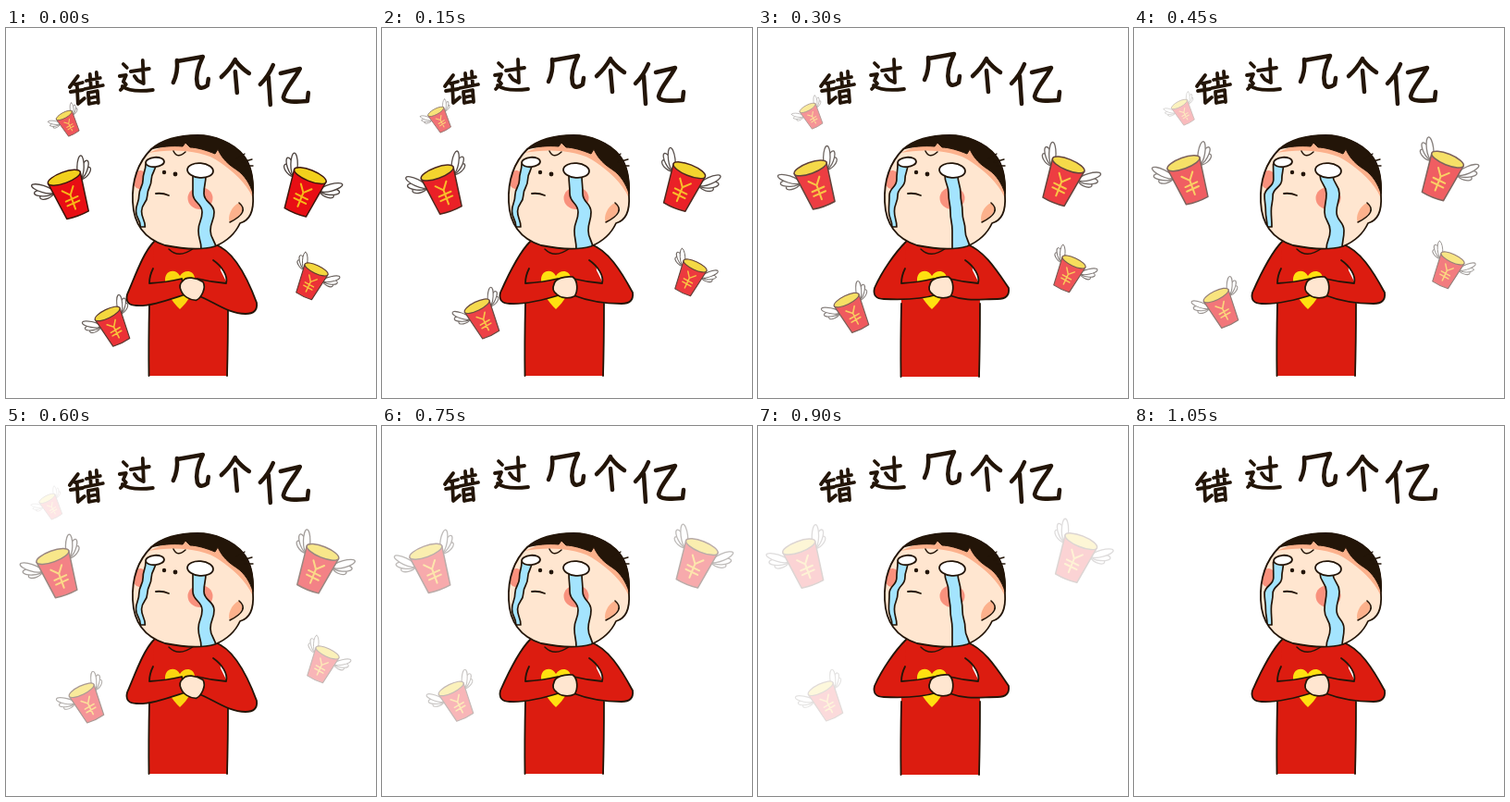
Write an HTML page with a canvas that moves like this. It is 400 px wide and 400 px high and loops after 1200 ms.

```html
<!DOCTYPE html>
<html lang="zh">
<head>
<meta charset="utf-8">
<style>
html, body { margin: 0; width: 100%; height: 100%; overflow: hidden; background: #fff; }
canvas { display: block; width: 100%; height: 100%; }
</style>
</head>
<body>
<canvas id="stage" width="400" height="400" role="img" aria-label="错过几个亿"></canvas>
<script>
const ctx = document.getElementById('stage').getContext('2d');
const STEP = 150, STEPS = 8;
const INK = '#231508', RED = '#dc1c10', SKIN = '#ffe6d0', PEACH = '#fcb18c';
const CORAL = '#f9917d', TEAR = '#a4e4fe', YELLOW = '#ffe010';

ctx.lineCap = ctx.lineJoin = 'round';

function draw(d, fill, stroke, width = 1.8) {
  const p = new Path2D(d);
  if (fill) { ctx.fillStyle = fill; ctx.fill(p); }
  if (stroke) { ctx.strokeStyle = stroke; ctx.lineWidth = width; ctx.stroke(p); }
}

function oval(x, y, rx, ry, rot, fill, stroke, width = 1.8) {
  ctx.beginPath();
  ctx.ellipse(x, y, rx, ry, rot, 0, Math.PI * 2);
  ctx.fillStyle = fill;
  ctx.fill();
  if (stroke) { ctx.strokeStyle = stroke; ctx.lineWidth = width; ctx.stroke(); }
}

function placed(x, y, paint) {
  ctx.save();
  ctx.translate(x, y);
  paint();
  ctx.restore();
}

// Hand-lettered strokes, one entry per character
const letters = [
  'M77 51L68 63M74 60L82 58M69 68L82 66M76 60L77 81L84 75M86 56L101 53M90 49L91 63M97 47L98 61M84 65L104 61M88 69L89 81M88 69L98 67L99 80M89 75L98 73M89 81L99 79',
  'M126 38L130 42M122 51L129 50L126 57L129 60L123 66M125 62Q134 69 158 66M134 46L154 43M147 34L148 59L142 56M138 51L141 55',
  'M184 34C185 44 183 52 180 58M184 35L212 30C207 40 204 51 206 60Q209 67 217 61L218 54',
  'M247 33Q241 44 232 52M247 34Q254 43 262 48M247 46L249 69',
  'M288 39Q283 51 274 60M283 52L285 82M296 48L317 43C311 55 301 64 299 74C300 80 312 79 325 78L326 69'
];

function title(pose) {
  letters.forEach((d, i) => {
    const dx = pose ? 0 : 0.8;
    const dy = i === 2 ? [1, 0, -2][pose] : pose ? 0 : 1;
    placed(dx, dy, () => draw(d, null, INK, i < 2 ? 3.8 : 4.5));
  });
}

// Flying cups: start, velocity, y acceleration, size, tilt, fade
const cups = [
  { x: 70, y: 181.5, vx: -3.1, vy: -5.2, size: 1, tilt: -20, alpha: 1, end: 7, power: 1.3 },
  { x: 321, y: 179, vx: 3.4, vy: -5.8, size: 1, tilt: 22, alpha: 1, end: 7, power: 1.3 },
  { x: 68, y: 104, vx: -4.6, vy: -4, size: 0.52, tilt: -28, alpha: 0.7, end: 4.6, power: 1.2 },
  { x: 117, y: 324, vx: -7, vy: -9, ay: 0.8, size: 0.8, tilt: -26, alpha: 0.85, end: 7, power: 1.3 },
  { x: 329, y: 275, vx: 3, vy: -4, size: 0.74, tilt: 25, alpha: 0.85, end: 5, power: 2 }
];

function wing(x, y, angle, side, line) {
  placed(x, y, () => {
    ctx.scale(side, 1);
    ctx.rotate(angle);
    [[-0.4, 16], [-0.05, 21], [0.3, 25]].forEach(([turn, len]) => {
      ctx.save();
      ctx.rotate(-turn);
      oval(len / 2, 0, len / 2, 3.7, 0, '#fff', line, 1.3);
      ctx.restore();
    });
  });
}

function cup(c, s) {
  const a = c.alpha * (1 - (s / c.end) ** c.power);
  if (s >= c.end || a <= 0) return;
  const tint = (...rgb) => `rgb(${rgb.map(v => Math.round(255 + (v - 255) * a))})`;
  const line = tint(60, 22, 12), feather = tint(75, 65, 60);
  const flap = s % 2 * 0.14;
  placed(c.x + c.vx * s, c.y + c.vy * s + (c.ay || 0) * s * s, () => {
    ctx.rotate(c.tilt * Math.PI / 180);
    ctx.scale(c.tilt > 0 ? -c.size : c.size, c.size);
    wing(-16, -10, -0.35 - flap, -1, feather);
    wing(16, -14, -0.9 + flap, 1, feather);
    draw('M-18.5 -21L-12.500 22Q0 24 12.500 22L18.5 -21Z', tint(232, 14, 20), line, 1.5);
    oval(0, -21, 18.5, 6, 0, tint(242, 208, 28), line, 1.5);
    draw('M-7 -8L0 -1L6 -9M0 -1L0 15M-7 4L7 3M-7 9L7 8', null, tint(248, 184, 24), 2);
  });
}

function body(pose) {
  const rest = pose > 0, base = pose === 2 ? 377 : 376;
  const lx = [131, 128, 126][pose], ly = [288, 286, 281][pose];
  const rx = 271, ry = [297, 286, 281][pose];
  draw(`M160 229L156 262L154 278L155 298L154 ${base}L240 ${base}L240 297L239 276L232 262L229 231Z`, RED);
  draw(`M155 298Q154 340 154.500 ${base}M240 298Q240 340 239 ${base}`, null, INK);
  draw('M176 239Q187 250 203 238', null, INK, 1.5);
  draw('M188 304C180 297 171 283 172 271C173 261 184 260 188 268C193 260 203 262 204 270C205 284 196 297 188 304Z',
    rest ? YELLOW : '#fbd50f');
  draw(`M160 231C148 243 ${lx + 8} ${ly - 18} ${lx} ${ly}C${lx - 2} ${ly + 8} ${lx + 2} ${ly + 12} ${lx + 10} ${ly + 12}
    C156 ${ly + 13} 175 294 194 288L190 271Q174 275 155 276Q155 268 159 260`, RED, INK);
  draw(`M226 234C244 240 258 262 ${rx} ${ry}C${rx + 1} ${ry + 8} ${rx - 3} ${ry + 12} ${rx - 12} ${ry + 12}
    C240 ${ry + 12} 225 296 207 289L207 271Q223 275 238 276C240 268 234 258 224 251`, RED, INK);
  placed(rest ? 198 : 201, rest ? 280 : 281, () => {
    if (!rest) ctx.rotate(0.45);
    draw('M-12 -3C-11 -9 -1 -12 8 -11C14 -7 14 5 10 10C4 13 -5 12 -9 8C-13 5 -14 1 -12 -3Z', SKIN, INK, 1.7);
  });
}

// Tear edges at even heights: x positions down each side
const tears = [
  { left: [202, 202, 212, 208, 211], right: [216, 214, 225, 221, 227] },
  { left: [202, 203, 212, 208, 210], right: [216, 217, 226, 223, 228] },
  { left: [202, 206, 208, 210, 210], right: [216, 219, 221, 224, 229] },
  { left: [201, 208, 206, 212, 208], right: [215, 222, 219, 227, 225] }
];

function smooth(points) {
  points.forEach(([x, y], i) => {
    if (!i) return ctx.lineTo(x, y);
    const [px, py] = points[i - 1], mid = (py + y) / 2;
    ctx.bezierCurveTo(px, mid, x, mid, x, y);
  });
}

function stream(left, right, top, gap) {
  const side = xs => xs.map((x, i) => [x, top + gap * i]);
  ctx.beginPath();
  smooth(side(left));
  smooth(side(right).reverse());
  ctx.closePath();
  ctx.fillStyle = TEAR;
  ctx.fill();
  ctx.strokeStyle = INK;
  ctx.lineWidth = 1.7;
  ctx.stroke();
}

const HEAD = 'M157 131C143 145 136 165 137 188C138 212 150 228 172 235C192 239 212 240 226 236C238 231 248 222 253 211C264 208 268 196 267 181C268 160 264 147 257 138C246 124 225 116 207 116C190 116 170 120 157 131Z';
const HAIR = 'M157 131C170 120 190 116 207 116C225 116 246 124 257 138C264 147 268 160 267 179C264 169 258 159 249 153C241 148 234 142 229 131L226 136C216 132 206 129 199 129L194 124L191 128C180 127 167 128 157 131Z';

function head(phase) {
  draw(HEAD, SKIN);
  ctx.save();
  ctx.clip(new Path2D(HEAD));
  draw('M154 135C180 130 214 132 231 145C245 155 259 166 267 184L267 150L200 116Z', PEACH);
  draw('M252 189Q262 199 242 210C239 205 243 193 252 189Z', PEACH);
  oval(145, 164, 8, 10, 0.1, CORAL);
  oval(210, 184, 13.5, 12, 0, CORAL);
  const t = tears[phase];
  const sway = t.left.map((x, i) => (x - [202, 204, 208, 209, 208][i]) * 0.45);
  stream([151, 149, 142, 141, 144].map((x, i) => x + sway[i]),
    [162, 158, 151, 147, 149].map((x, i) => x + sway[i]), 147, 17);
  stream(t.left, t.right, 159, 20);
  ctx.restore();
  draw(HEAD, null, INK);
  draw('M252 189Q264 199 242 210', null, INK, 1.6);
  draw(HAIR, INK, INK, 1);
  draw('M249 141L258 136M255 145L266 142M258 149L267 149', null, INK, 1.4);
  draw('M181 133Q185 142 194 134', null, INK, 1.5);
  oval(161, 145, 10, 5.2, -0.08, '#fff', INK);
  oval(210, 154, 14, 7.8, 0.08, '#fff', INK);
  oval(171, 156, 2.2, 2.2, 0, INK);
  oval(183, 158, 2.4, 2.4, 0, INK);
  draw('M162 179Q169 178 176 181', null, INK);
}

function frame(now) {
  const step = Math.floor(now / STEP) % STEPS;
  const phase = step % 4;
  const pose = [0, 1, 2, 1][phase];
  ctx.fillStyle = '#fff';
  ctx.fillRect(0, 0, 400, 400);
  cups.forEach(c => cup(c, step));
  title(pose);
  body(pose);
  head(phase);
}

const start = performance.now();
function tick() {
  frame(performance.now() - start);
  requestAnimationFrame(tick);
}
tick();
</script>
</body>
</html>
```
